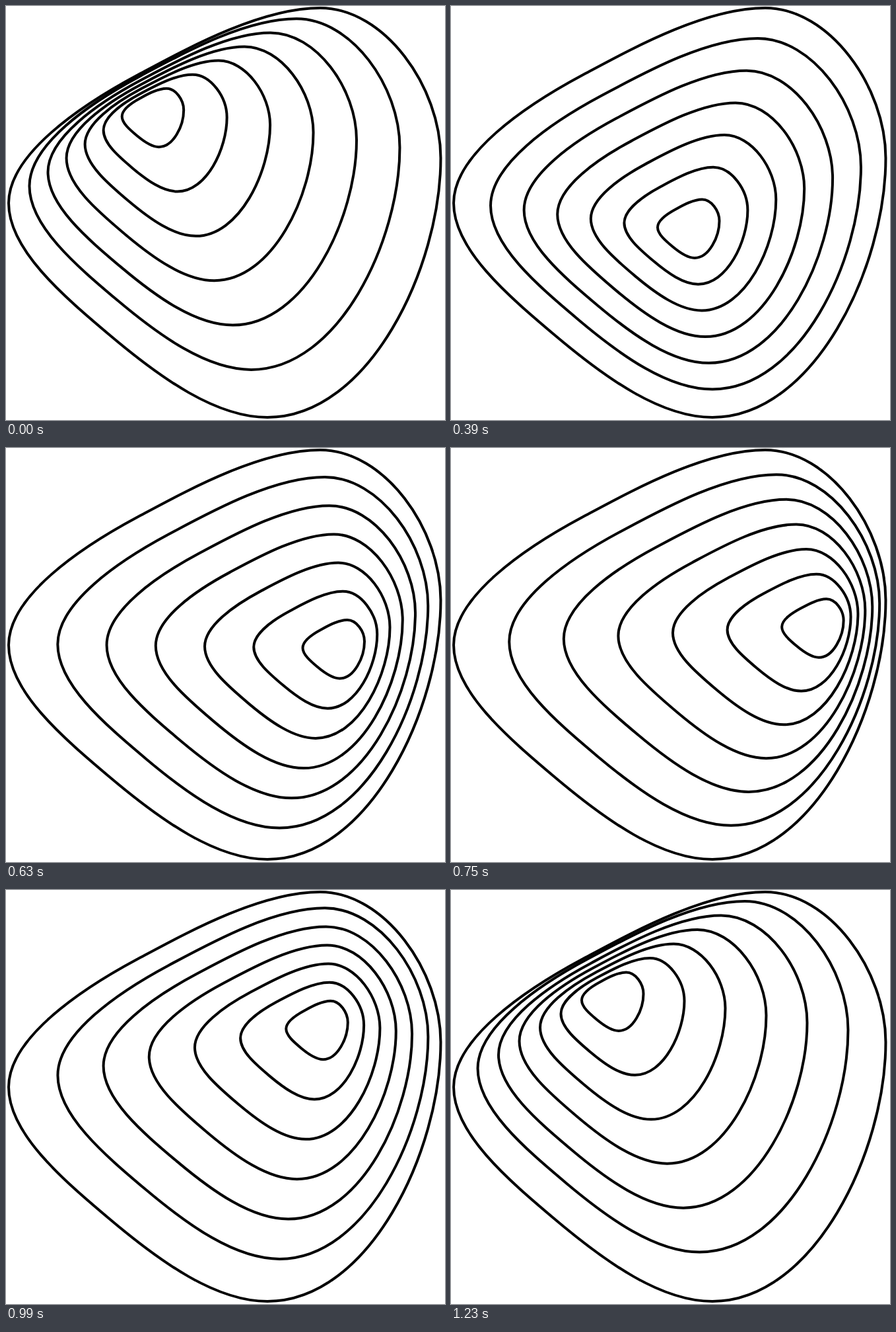
Animation of 665 by 626 pixels, one loop 1.26 s. Source, as an HTML page:

```html
<!DOCTYPE html>
<html lang="en">
<head>
<meta charset="utf-8">
<title>Nested rings</title>
<style>
  html, body { margin: 0; width: 100%; height: 100%; overflow: hidden; background: #fff; }
  svg { display: block; width: 100%; height: 100%; }
  path { fill: none; stroke: #000; stroke-width: 4; vector-effect: non-scaling-stroke; }
</style>
</head>
<body>
<svg viewBox="0 0 665 626"></svg>
<script>
const LOOP = 1260, STEP = 30, RINGS = 7;

// Rounded triangle, relative to its top-left corner
const SHAPE = 'M0 295C0 222 106 149 196 101C271 61 381 0 472 0C569 0 654.5 119 654.5 227' +
  'C654.5 392 546 619 392 619C314 619 231 560 156 497C81 434 0 365 0 295Z';

// time, corner of the smallest ring (x, y), corner of the largest moving ring (x, y)
const KEYS = [
  [60, 147, 134, 27.5, 26],
  [180, 224, 211, 38, 38],
  [390, 313, 292.5, 60, 49],
  [480, 368, 306, 69, 52],
  [630, 449.5, 260, 78.3, 44],
  [870, 509, 199, 92, 36],
  [1110, 305, 141, 58.5, 19.5],
  [1230, 198, 124.5, 40.5, 17]
];

const svg = document.querySelector('svg');
const rings = Array.from({ length: RINGS }, () => {
  const path = document.createElementNS('http://www.w3.org/2000/svg', 'path');
  path.setAttribute('d', SHAPE);
  return svg.appendChild(path);
});

function place(k, x, y) {
  rings[k - 1].setAttribute('transform', `translate(${x} ${y}) scale(${k / RINGS})`);
}

const mix = (a, b, f) => a + (b - a) * f;

// Key with a wrapped index, its time continued past the loop
function key(i) {
  const lap = Math.floor(i / KEYS.length);
  const [t, ...v] = KEYS[i - lap * KEYS.length];
  return [t + lap * LOOP, ...v];
}

function slope(i, c) {
  const a = key(i - 1), b = key(i), d = key(i + 1);
  const h0 = b[0] - a[0], h1 = d[0] - b[0];
  return mix((b[c] - a[c]) / h0, (d[c] - b[c]) / h1, h0 / (h0 + h1));
}

// Closed smooth curve through the keys
function sample(t) {
  let i = KEYS.length - 1;
  while (key(i)[0] > t) i--;
  const a = key(i), b = key(i + 1), h = b[0] - a[0], u = (t - a[0]) / h, w = 1 - u;
  return [1, 2, 3, 4].map(c =>
    w * w * ((1 + 2 * u) * a[c] + u * h * slope(i, c)) +
    u * u * ((1 + 2 * w) * b[c] - w * h * slope(i + 1, c)));
}

function draw(t) {
  const [x1, y1, x2, y2] = sample(t);
  for (let k = 1; k < RINGS; k++) {
    const f = (k - 1) / (RINGS - 2);
    place(k, mix(x1, x2, f), mix(y1, y2, f));
  }
}

const start = performance.now();
function tick() {
  const t = (performance.now() - start) % LOOP;
  draw(Math.floor(t / STEP) * STEP);
  requestAnimationFrame(tick);
}

place(RINGS, 4, 3);
tick();
</script>
</body>
</html>
```
